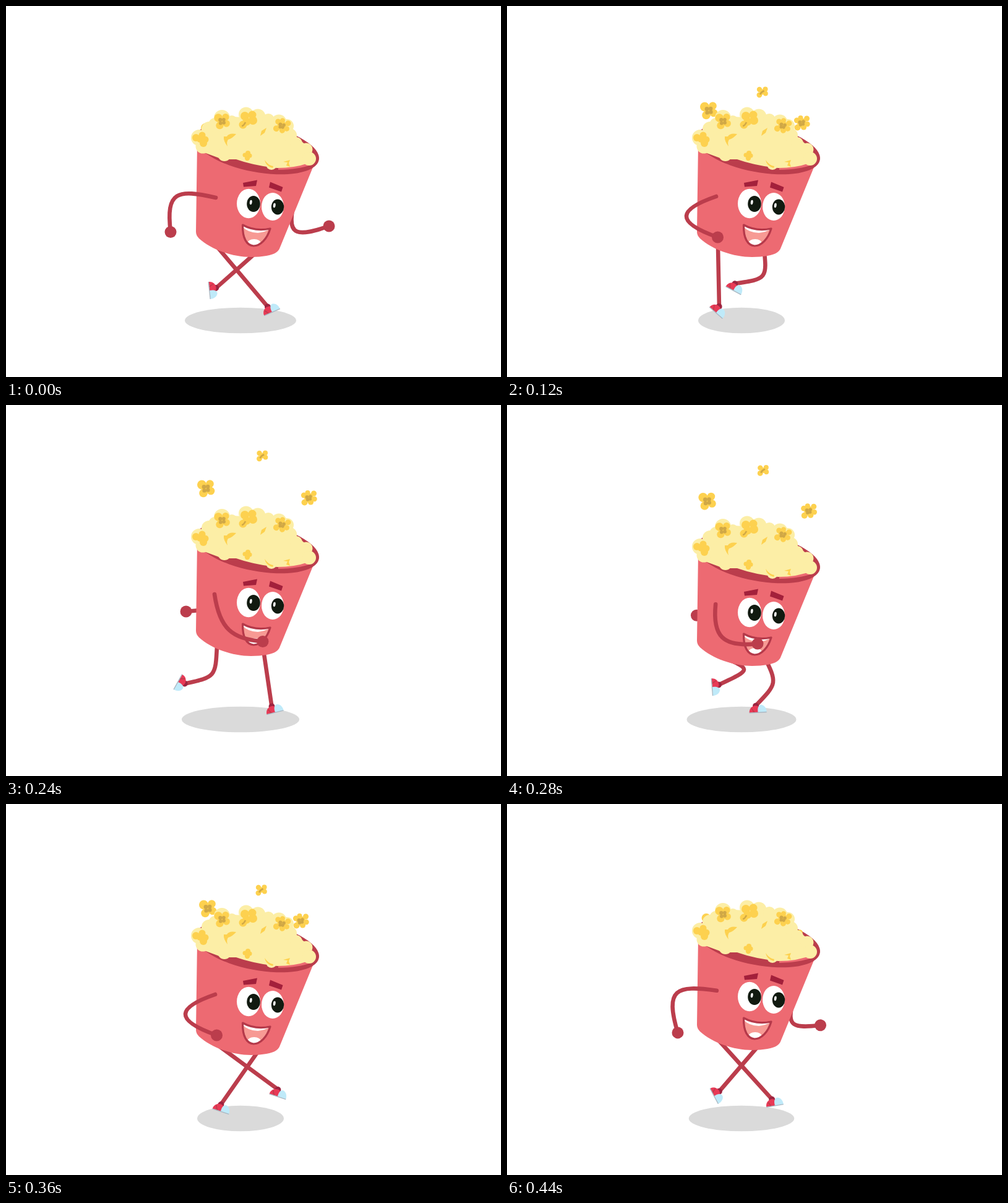
Animation of 800x600 px, one loop 0.48 s. Source, as an HTML page:

```html
<!DOCTYPE html>
<html lang="en">
<head>
<meta charset="utf-8">
<title>Running popcorn bucket</title>
<style>
  html, body { margin: 0; width: 100%; height: 100%; overflow: hidden; background: #fff; }
  svg { display: block; width: 100vw; height: 100vh; }
  .limb { fill: none; stroke: #bb3d4c; stroke-width: 6.6; stroke-linecap: round; }
  .dark { fill: #bb3d4c; }
  .corn { fill: #fceea6; }
  .gold { fill: #fdd14f; }
  .tan { fill: #d0a846; }
  .brow { fill: #a3203b; }
  .eye { fill: #fff; }
  .pupil { fill: #111a10; }
</style>
</head>
<body>
<svg viewBox="0 0 800 600">
  <defs>
    <g id="shoe">
      <circle cx="-3" cy="-10.5" r="5" fill="#9c2440"/>
      <path d="M-14 0C-14-7-9-11-3-11L1-10V0Z" fill="#e83a56"/>
      <path d="M-10-7L-6 0" stroke="#bb3d4c" stroke-width="1.6"/>
      <path d="M0 0C-1-8 2-12 6-12C11-11 14-6 14 0Z" fill="#bfeaf9"/>
      <path d="M-14 .3H14" stroke="#a9b7c2" stroke-width="1.3"/>
    </g>
    <g id="clover">
      <g class="gold">
        <circle cx="-6.5" cy="-6" r="7.5"/><circle cx="6.5" cy="-7.5" r="6.3"/>
        <circle cx="8" cy="4" r="6.3"/><circle cx="-4" cy="7.5" r="6.8"/><circle r="7.5"/>
      </g>
      <g class="tan">
        <circle cx="-3" cy="-2.6" r="3.4"/><circle cx="3.2" cy="-3" r="3.2"/>
        <circle cx="3.4" cy="2.4" r="3.2"/><circle cx="-2.4" cy="3.4" r="3.2"/>
      </g>
    </g>
    <g id="star">
      <g class="gold">
        <circle cx="-8" cy="-4" r="4.6"/><circle cx="-2" cy="-8" r="4"/><circle cx="8" cy="-7" r="4.5"/>
        <circle cx="9" cy="2" r="4.2"/><circle cx="3" cy="7" r="4.6"/><circle cx="-7" cy="7.5" r="5"/>
        <circle r="7.5"/>
      </g>
      <g class="tan">
        <circle cx="-3" cy="-1" r="3"/><circle cx="2.5" cy="-2" r="2.7"/>
        <circle cx="2" cy="2" r="2.6"/><circle cx="-2" cy="3" r="2.6"/>
      </g>
    </g>
    <g id="bit">
      <g class="gold">
        <circle cx="-4.5" cy="-4" r="4.2"/><circle cx="5" cy="-4.6" r="4"/>
        <circle cx="5.4" cy="2.6" r="3.9"/><circle cx="-4.6" cy="4.8" r="4.4"/><circle r="4.4"/>
      </g>
      <path d="M-3.5 4L-1 .5L3-2" fill="none" stroke="#d0a846" stroke-width="2.8"/>
    </g>
  </defs>

  <ellipse id="shadow" cx="379" cy="508.5" ry="20.8" fill="#dadada"/>
  <g id="far"><path class="limb"/><circle class="dark" r="9.5"/></g>
  <g id="legR"><path class="limb"/><use href="#shoe"/></g>
  <g id="legL"><path class="limb"/><use href="#shoe"/></g>

  <g id="body">
    <path fill="#ed6a72" d="M309 225L307 365Q307 371 312 376C332 394 366 406 396 406C415 406 430 403 436 399Q441 396 443 390L498 256Z"/>
    <ellipse class="dark" cx="406" cy="230" rx="101.5" ry="38.5" transform="rotate(10.8 406 230)"/>
    <path d="M440 265Q474 264 492 257L480 250L440 255Z" fill="#ed6a72"/>

    <use id="left" href="#clover"/><use id="top" href="#bit"/><use id="right" href="#star"/>

    <g class="corn">
      <path d="M308 222L318 200L336 187L352 178L382 180L410 176L440 185L462 202L470 212L488 228L494 252Q470 262 438 262Q400 258 372 248L350 248L315 235Z"/>
      <circle cx="312" cy="213" r="13"/><circle cx="318" cy="227" r="11.5"/>
      <circle cx="328" cy="199" r="12"/><circle cx="338" cy="192" r="11"/>
      <circle cx="349" cy="181" r="13"/><circle cx="365" cy="186" r="9"/>
      <circle cx="388" cy="175.5" r="12"/><circle cx="407" cy="179" r="12.5"/>
      <circle cx="424" cy="184" r="10"/><circle cx="441" cy="188" r="12.5"/>
      <circle cx="454" cy="194" r="11"/><circle cx="459" cy="209" r="11"/>
      <circle cx="469" cy="222" r="10"/><circle cx="485" cy="232" r="10.5"/>
      <circle cx="490" cy="247" r="11"/><circle cx="353" cy="240" r="11"/>
      <circle cx="429" cy="256" r="9"/>
    </g>
    <use href="#clover" transform="translate(349 186.5) scale(.9)"/>
    <use href="#star" transform="translate(446 193.5) rotate(20)"/>
    <g class="gold">
      <circle cx="386" cy="178" r="7"/><circle cx="398" cy="176" r="6.5"/><circle cx="399" cy="185" r="7"/>
      <circle cx="389" cy="187" r="6.5"/><circle cx="383" cy="192" r="6.5"/>
      <circle cx="317" cy="209" r="5.5"/><circle cx="307" cy="213" r="6"/><circle cx="314" cy="215" r="6"/>
      <circle cx="322" cy="216" r="5.5"/><circle cx="319" cy="222" r="6"/>
      <circle cx="391" cy="238" r="4"/><circle cx="386" cy="241" r="3.5"/>
      <circle cx="394" cy="242" r="3.5"/><circle cx="390" cy="246" r="4.2"/>
      <path d="M372 207Q360 205 357 211L352 211Q351 218 358 227Q356 220 359 216Q366 214 372 207Z"/>
      <path d="M421 197L413 202L411 210L418 205Z"/>
      <path d="M418 249Q420 259 431 262L432 259Q424 258 418 249Z"/>
      <path d="M448 252L459 249L457 254L459 260L453 258L455 253Z"/>
    </g>
    <path d="M381 194Q384 194 387 188" fill="none" stroke="#d0a846" stroke-width="2.6"/>

    <path class="brow" d="M383 286L406 281.5L404 291L384 292.5ZM427 284.5L447.5 293L445 300.5L425 293.5Z"/>
    <ellipse class="eye" cx="392" cy="319.5" rx="19" ry="23.7"/>
    <ellipse class="eye" cx="431" cy="324.5" rx="18" ry="22.5"/>
    <ellipse class="pupil" cx="400" cy="320" rx="10.8" ry="13"/>
    <ellipse class="pupil" cx="439" cy="325" rx="10.2" ry="12.5"/>
    <ellipse class="eye" cx="395.8" cy="317.5" rx="1.9" ry="3.7" transform="rotate(8 396 317)"/>
    <ellipse class="eye" cx="433.8" cy="322.5" rx="1.9" ry="3.7" transform="rotate(8 434 322)"/>

    <clipPath id="lips"><path id="grin" d="M382.5 354Q402 365 427 360C422 377 411 388 400 388C389 387 382 376 382.5 354Z"/></clipPath>
    <g clip-path="url(#lips)">
      <rect x="380" y="350" width="50" height="42" fill="#f79a94"/>
      <path d="M380 354Q388 366 407 367Q420 366 428 359L405 355Z" fill="#fff"/>
      <ellipse cx="401" cy="384" rx="11" ry="7" fill="#fff"/>
    </g>
    <use href="#grin" fill="none" stroke="#b5394a" stroke-width="3.2" stroke-linejoin="round"/>
  </g>
  <g id="near"><path class="limb"/><circle class="dark" r="9.5"/></g>
</svg>
<script>
const LOOP = 480, STEP = 40;
const $ = id => document.getElementById(id);
const move = (node, x, y, deg = 0) =>
  node.setAttribute('transform', `translate(${x} ${y}) rotate(${deg})`);

// Sole x, y and angle a quarter loop apart: reach, push off, lift, swing
const strideL = [[430, 495, -24], [338, 496, 41], [278, 448, 119], [439, 473, 18]];
const strideR = [[435, 497, -14], [347, 497, 18], [329, 460, 84], [366, 460, 28]];

// Position on a closed stride, with phase from 0 to 1
function along(stride, phase) {
  const q = (phase % 1) * 4, i = Math.floor(q);
  const next = stride[(i + 1) % 4];
  return stride[i].map((v, k) => v + (next[k] - v) * (q - i));
}

// The knee bends forward when the hip and ankle are closer than the leg is long
function drawLeg(id, stride, phase, hipX, hipY) {
  const [x, y, deg] = along(stride, phase);
  const a = deg * Math.PI / 180, cos = Math.cos(a), sin = Math.sin(a);
  const ax = x - 3 * cos + 11 * sin, ay = y - 3 * sin - 11 * cos;
  const dx = ax - hipX, dy = ay - hipY, d = Math.hypot(dx, dy);
  const bend = .7 * Math.sqrt(Math.max(0, 92 * 92 - d * d)) / d;
  const knee = `${hipX + dx / 2 + dy * bend} ${hipY + dy / 2 - dx * bend}`;
  const [line, shoe] = $(id).children;
  line.setAttribute('d', `M${hipX} ${hipY}C${knee} ${knee} ${ax} ${ay}`);
  move(shoe, x, y, deg);
}

// Points: shoulder, two curve handles, hand
function drawArm(id, lift, ...points) {
  const [line, hand] = $(id).children;
  const [start, ...curve] = points.map(p => p.join(' '));
  line.setAttribute('d', `M${start}C${curve.join(' ')}`);
  move(hand, ...points[3]);
  move($(id), 0, lift);
}

function draw(now) {
  const step = Math.floor((now % LOOP) / STEP);
  const phase = step * STEP / LOOP, turn = phase * 2 * Math.PI;
  const c = Math.cos(turn), c2 = Math.cos(2 * turn), flick = 13 * Math.sin(2 * turn);

  // Two bounces per loop: a quick jolt, then a steady return
  const lift = 8 * ((3 - step % 3) % 3) * (step % 6 < 3 ? 1 : -1);
  move($('body'), 0, lift);
  $('shadow').setAttribute('rx', 70 + (11.25 - 1.25 * c) * (1 + c2));

  drawLeg('legL', strideL, phase, 341, 389 + lift);
  drawLeg('legR', strideR, phase + .5, 415, 389 + lift);

  drawArm('near', lift,
    [338 + c, 308 + 2 * c],
    [294 - 34 * c + 17 * c2, 329 - 33 * c],
    [291 - 54 * c + 21 * c2, 344 - 40 * c - 5 * c2],
    [340.5 - 74.5 * c, 374 - 8.5 * c - flick]);
  drawArm('far', lift,
    [452 + 11 * c, 330],
    [428 + 28 * c, 350 + 20 * c],
    [410 + 60 * c, 351 + 23 * c],
    [406.5 + 115.5 * c, 345 + 11 * c - flick]);

  // Kernels fly up and fall back into the bucket
  move($('left'), 326 + 3 * c, 169 + 34 * c);
  move($('top'), 412.5 - 1.5 * c, 139 + 57 * c);
  move($('right'), 476.5 - 13 * c, 189 + 39 * c);
}

function tick() {
  draw(performance.now());
  requestAnimationFrame(tick);
}
tick();
</script>
</body>
</html>
```
